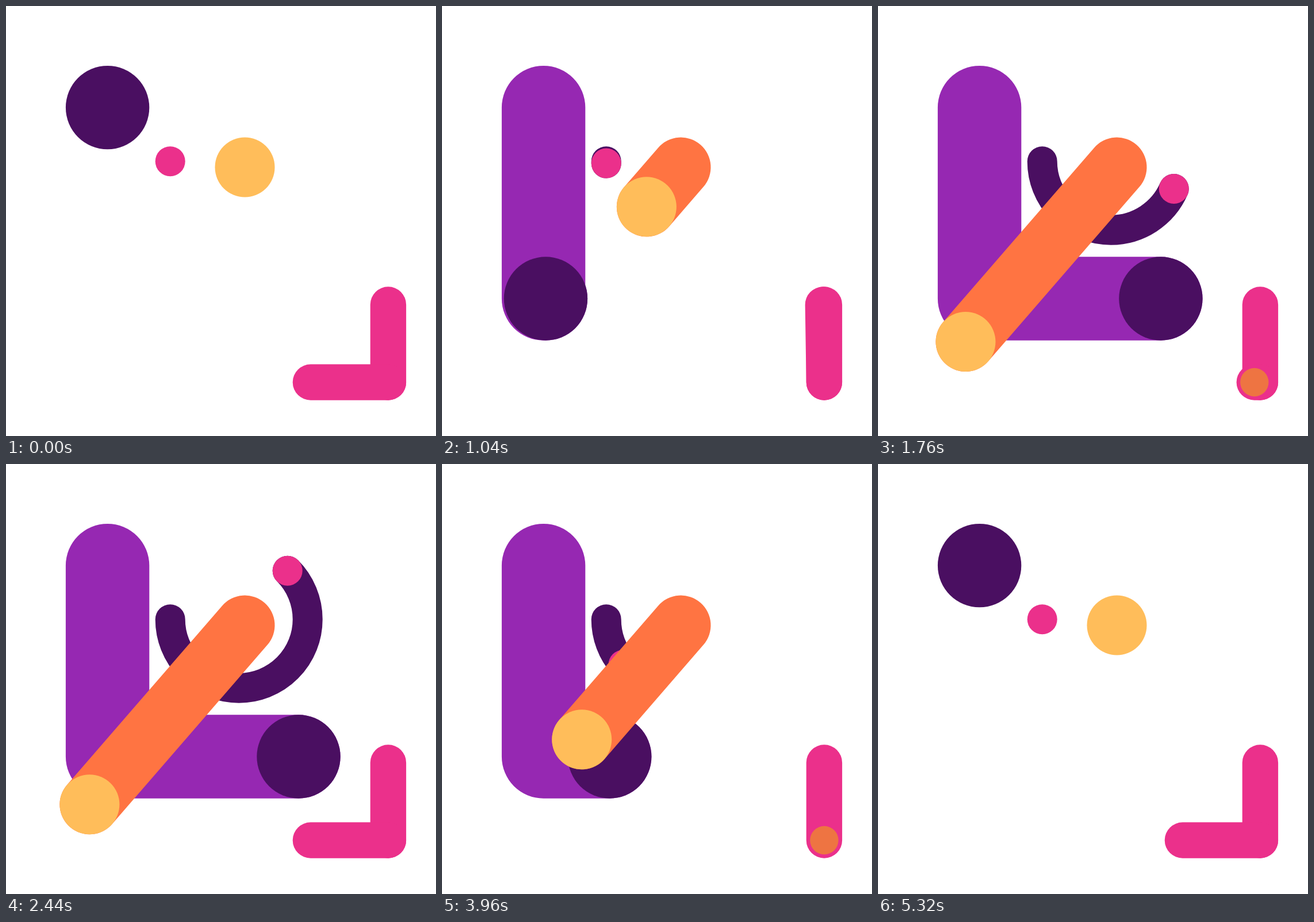
An HTML page with a canvas for the animation above (5880 ms loop, 748x748 px).

```html
<!DOCTYPE html>
<html lang="en">
<head>
<meta charset="utf-8">
<title>Growing strokes</title>
<style>
  html, body { margin: 0; width: 100%; height: 100%; overflow: hidden; background: #fff; }
  canvas { display: block; width: 748px; height: 748px; }
</style>
</head>
<body>
<canvas id="stage" width="748" height="748"></canvas>
<script>
const ctx = document.getElementById('stage').getContext('2d');
const LOOP = 5880, RETURN = 5320, STEP = 40;
const PURPLE = '#9628b2', DARK = '#4a0f61', PINK = '#eb308b';
const YELLOW = '#ffbd5a', ORANGE = '#ff7442', DOT = '#ee7442';

const clamp = v => Math.min(1, Math.max(0, v));
const mix = (a, b, p) => a + (b - a) * p;

// Symmetric cubic Bezier easing, solved for its parameter by bisection.
function ease(x) {
  const a = 0.46;
  let lo = 0, hi = 1;
  if (x <= 0 || x >= 1) return clamp(x);
  for (let i = 0; i < 30; i++) {
    const s = (lo + hi) / 2, q = 1 - s;
    const at = 3 * a * s * q * q + 3 * (1 - a) * s * s * q + s * s * s;
    if (at < x) lo = s; else hi = s;
  }
  return lo * lo * (3 - 2 * lo);
}

const progress = (t, start, end) => ease((t - start) / (end - start));

function disc(x, y, r, color) {
  ctx.fillStyle = color;
  ctx.beginPath();
  ctx.arc(x, y, r, 0, Math.PI * 2);
  ctx.fill();
}

function strokePath(width, color) {
  ctx.lineWidth = width;
  ctx.strokeStyle = color;
  ctx.stroke();
}

function line(points, width, color) {
  ctx.beginPath();
  points.forEach(([x, y]) => ctx.lineTo(x, y));
  strokePath(width, color);
}

function drawCorner(t) {
  const start = 176.6, end = 509, r = 72.7;
  const y = mix(start, end, progress(t, 0, 966));
  const across = progress(t, 960, 1924);
  const x = mix(start, end, across);
  if (t > 0) {
    const points = [[start, start], [start, y]];
    if (across > 0) points.push([x, y]);
    line(points, r * 2, PURPLE);
  }
  disc(x, y, r, DARK);
}

function drawArc(t) {
  const cx = 405.2, cy = 270.2, radius = 119.5, r = 26;
  const p = progress(t, 952, 2277);
  const angle = Math.PI * (1 - 1.25 * p);
  if (p > 0) {
    ctx.beginPath();
    ctx.arc(cx, cy, radius, Math.PI, angle, true);
    strokePath(r * 2, DARK);
  }
  disc(cx + radius * Math.cos(angle), cy + radius * Math.sin(angle), r, PINK);
}

function drawDiagonal(t) {
  const from = [415.5, 280.5], r = 52;
  const p = progress(t, 594, 1924);
  const to = [mix(from[0], 145.4, p), mix(from[1], 592.2, p)];
  if (p > 0) line([from, to], r * 2, ORANGE);
  disc(...to, r, YELLOW);
}

function drawHinge(t) {
  const x = 664.9, y = 654.5, arm = 135, width = 62.4;
  const fold = progress(t, 0, 1126) * Math.PI / 2;
  const grow = progress(t, 1620, 2310);
  line([[x, y - arm], [x, y]], width, PINK);
  if (fold < Math.PI / 2) {
    line([[x, y], [x - arm * Math.cos(fold), y - arm * Math.sin(fold)]], width, PINK);
  } else if (grow > 0) {
    line([[x, y], [x - arm * grow, y]], width, PINK);
  }
  const r = 24.7 * progress(t, 1090, 1340) * (1 - clamp(grow * 2 - 1));
  if (r > 0) disc(x - arm * grow, y, r, DOT);
}

function draw(now) {
  const time = Math.floor((now % LOOP) / STEP) * STEP;
  const t = Math.max(0, Math.min(time, RETURN - time));
  ctx.fillStyle = '#fff';
  ctx.fillRect(0, 0, 748, 748);
  ctx.lineCap = ctx.lineJoin = 'round';
  drawCorner(t);
  drawArc(t);
  drawDiagonal(t);
  drawHinge(t);
}

let origin;
function frame(now) {
  origin ??= now;
  draw(Math.max(0, now - origin));
  requestAnimationFrame(frame);
}
draw(0);
requestAnimationFrame(frame);
</script>
</body>
</html>
```
